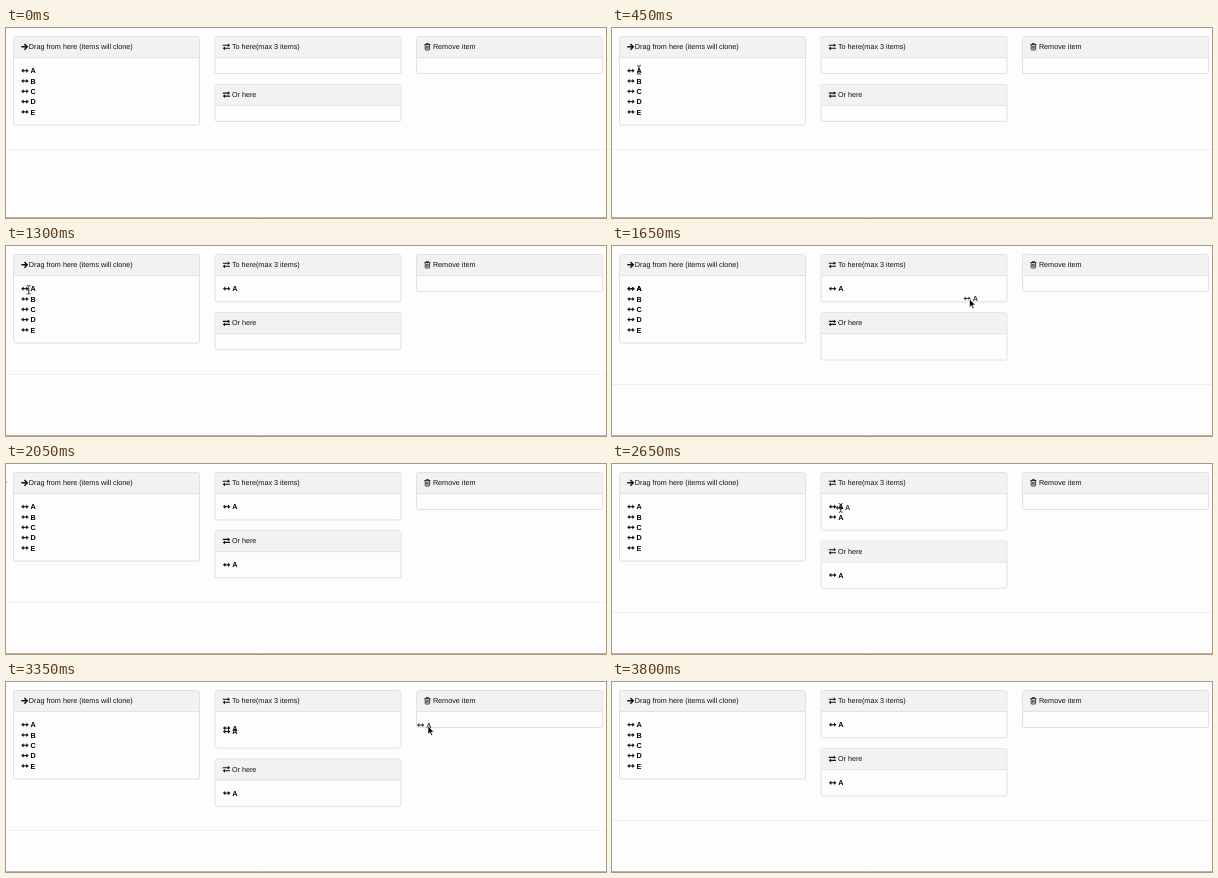
An HTML page for the animation above (4200 ms loop, 600 by 190 pixels).

```html
<!DOCTYPE html>
<html lang="en">
<head>
<meta charset="utf-8">
<title>Drag and clone lists</title>
<style>
  html, body { margin: 0; width: 100%; height: 100%; overflow: hidden; background: #fdfdfd; }
  svg { display: block; width: 600px; height: 190px; }
  text { font: 7.22px "Liberation Sans", Arial, sans-serif; fill: #111; text-rendering: geometricPrecision; }
  .row text { font-weight: bold; fill: #000; }
  .icon { fill: none; stroke: #111; stroke-width: 1.1; }
  .bold { stroke-width: 1.4; }
  .thin { stroke-width: .8; }
  .fill { fill: #111; stroke: none; }
  .box { fill: #fdfdfd; stroke: #d9d9d9; stroke-width: .8; }
  .head { fill: #f2f2f2; }
  .rule { stroke: #dcdcdc; stroke-width: .8; }
</style>
</head>
<body>
<svg id="stage" viewBox="0 0 600 190"></svg>
<script>
const LOOP = 4200, STEP = 50, LINE = 10.3, TOP = 8.6, EMPTY = 37;
const stage = document.getElementById('stage');

const icons = {
  right: `<path class="icon bold" d="M0 0H6M3.1-2.9L6 0L3.1 2.9"/>`,
  swap: `<path class="icon" d="M0-1.5H5.6M1.6 1.5H7.2"/>
    <path class="fill" d="M5-3.4L7.3-1.5L5 .3ZM2.2-.3L-.1 1.5L2.2 3.4Z"/>`,
  trash: `<path class="icon thin" d="M0-2.3H6M2-2.4V-3.3H4V-2.4"/>
    <path class="icon thin" d="M.8-2.2V2.6Q.8 3.2 1.4 3.2H4.6Q5.2 3.2 5.2 2.6V-2.2"/>
    <path class="icon" style="stroke-width:.6" d="M2.1-1.1V2M3-1.1V2M3.9-1.1V2"/>`
};

const row = (name, id = '', x = 0, y = 0) =>
  `<g class="row" id="${id}" transform="translate(${x} ${y})">
    <path class="icon" d="M1.5 0H5.8"/>
    <path class="fill" d="M2.3-2.1L-.1 0L2.3 2.1ZM5-2.1L7.4 0L5 2.1Z"/>
    <text x="9.3" y="2.6">${name}</text></g>`;

const panel = (id, x, icon, title, gap, rows = 0, inner = '') =>
  `<g id="${id}" transform="translate(0 ${TOP})">
    <rect class="box" x="${x}" width="186" height="${EMPTY + LINE * rows}" rx="2"/>
    <path class="head" d="M${x + .4} 20.8V2Q${x + .4} .4 ${x + 2} .4H${x + 184}Q${x + 185.6} .4 ${x + 185.6} 2V20.8Z"/>
    <path class="rule" d="M${x} 21H${x + 186}"/>
    <g transform="translate(${x + 7.8} 10.2)">${icons[icon]}</g>
    <text x="${x + gap}" y="12.8">${title}</text>${inner}</g>`;

stage.innerHTML =
  `<rect width="600" height="190" fill="#fdfdfd"/>
  <path id="hr" d="M0 0H600" stroke="#f0f0f0"/>
  <path d="M0 189.5H600" stroke="#b4b4b4"/>` +
  panel('from', 7.5, 'right', 'Drag from here (items will clone)', 15.3, 5) +
  panel('to', 209, 'swap', 'To here(max 3 items)', 16.9) +
  panel('or', 209, 'swap', 'Or here', 16.9, 0, row('A', 'second')) +
  panel('bin', 410.6, 'trash', 'Remove item', 16.3) +
  [...'ABCDE'].map((c, i) => row(c, '', 15.3, 42.7 + LINE * i)).join('') +
  row('A', 'first') + row('A', 'third') +
  `<g opacity=".8">${row('A', 'ghost')}</g>
  <path id="arrow" d="M0 0V8.2L1.9 6.5L3.2 9.4L4.6 8.8L3.3 6H5.9Z" fill="#000" stroke="#fff" stroke-width=".6"/>
  <path id="beam" d="M-2-4.4Q0-4.4 0-3.2Q0-4.4 2-4.4M0-3.4V3.4M-2 4.4Q0 4.4 0 3.2Q0 4.4 2 4.4M-1 .9H1"
    fill="none" stroke="#222" stroke-width=".8"/>`;

const el = id => document.getElementById(id);

// [time, x, y, shape]
const pointer = [
  [0, 64, 92, ''], [50, 64, 92, 'arrow'], [100, 64, 92, ''],
  [250, 77, 33, 'arrow'], [350, 56, 31, 'arrow'], [450, 27, 42, 'beam'], [500, 22.7, 43.5, 'beam'],
  [600, 22.7, 43.5, 'arrow'], [650, 42, 45, 'arrow'], [750, 196, 45, 'arrow'], [800, 229.5, 44, 'arrow'],
  [850, 232, 44, 'arrow'], [950, 232, 44, 'arrow'], [1050, 110, 47, 'arrow'], [1150, 6, 46, 'beam'],
  [1200, 6, 47, 'beam'], [1300, 22.7, 43.7, 'beam'],
  [1400, 22.7, 43.7, 'arrow'], [1500, 150, 32, 'arrow'], [1600, 425, 24, 'arrow'], [1700, 290, 82, 'arrow'],
  [1800, 219.5, 96, 'arrow'], [1900, 219.5, 96, 'arrow'], [2000, 62, 36, 'arrow'], [2050, -4.3, 12.6, 'arrow'],
  [2150, 4, 30, 'beam'], [2300, 22.7, 43.5, 'beam'],
  [2400, 22.7, 43.5, 'arrow'], [2500, 120, 45, 'arrow'], [2600, 222, 45, 'beam'], [2650, 228.7, 44, 'beam'],
  [2750, 230, 44, 'arrow'], [2950, 228, 43.5, 'arrow'], [3000, 232, 44, 'arrow'], [3150, 300, 50, 'arrow'],
  [3300, 402, 45, 'arrow'], [3350, 422, 44, 'arrow'], [3450, 439.5, 43.5, 'arrow'],
  [3700, 439.5, 43.5, 'arrow'], [3750, 442.3, 33, 'beam'], [3800, 442, 33, '']
];

// [start, end, dx, dy] of the carried row against the pointer
const drags = [[650, 900, -5.5, -.8], [1450, 1800, -6, -.5], [2450, 2700, -5, -.2], [3000, 3450, -11, -.9]];

const items = {
  first: [[750, 19, 47.2], [900, 217, 42.7], [2500, 217, 42.7], [2600, 217, 53],
    [3300, 217, 53], [3450, 217, 42.7], [LOOP, 217, 42.7]],
  second: [[1650, 15.3, -23.9], [1800, 217, 34.1], [LOOP, 217, 34.1]],
  third: [[2500, 15.3, 42.7], [2600, 217, 42.7], [3300, 217, 42.7], [3350, 217, 46.1],
    [3450, 418.6, 42.7], [3550, 418.6, 42.7]]
};

// [start, end, rows]
const counts = {
  to: [[750, 2500, 1], [2500, 3400, 2], [3400, LOOP, 1]],
  or: [[1650, LOOP, 1]],
  bin: [[3400, 3550, 1]]
};

function along(keys, t) {
  const i = keys.findLastIndex(k => k[0] <= t);
  if (i < 0) return null;
  const a = keys[i], b = keys[i + 1];
  if (!b) return null;
  const hold = a[3] === '' || b[3] === '';
  const p = hold ? 0 : (t - a[0]) / (b[0] - a[0]);
  return { x: a[1] + (b[1] - a[1]) * p, y: a[2] + (b[2] - a[2]) * p, shape: a[3] };
}

const span = (list, t) => list.find(s => t >= s[0] && t < s[1]);

function place(id, pos) {
  const node = el(id);
  node.style.display = pos ? '' : 'none';
  if (pos) node.setAttribute('transform', `translate(${pos.x} ${pos.y})`);
}

function size(id, t, top) {
  const s = span(counts[id], t);
  const h = EMPTY + LINE * (s ? s[2] : 0);
  el(id).querySelector('rect').setAttribute('height', h);
  place(id, { x: 0, y: top });
  return top + h;
}

function draw(t) {
  const bottom = size('or', t, size('to', t, TOP) + 10.8);
  size('bin', t, TOP);
  place('hr', { x: 0, y: Math.round(Math.max(97.1, bottom) + 23.9) + .5 });
  for (const id in items) place(id, along(items[id], t));

  const p = along(pointer, t);
  const d = span(drags, t);
  place('ghost', d && { x: p.x + d[2], y: p.y + d[3] });
  for (const shape of ['arrow', 'beam']) place(shape, p && p.shape === shape ? p : null);
}

const start = performance.now();
function tick() {
  const t = (performance.now() - start) % LOOP;
  draw(Math.floor(t / STEP) * STEP);
  requestAnimationFrame(tick);
}
tick();
</script>
</body>
</html>
```
